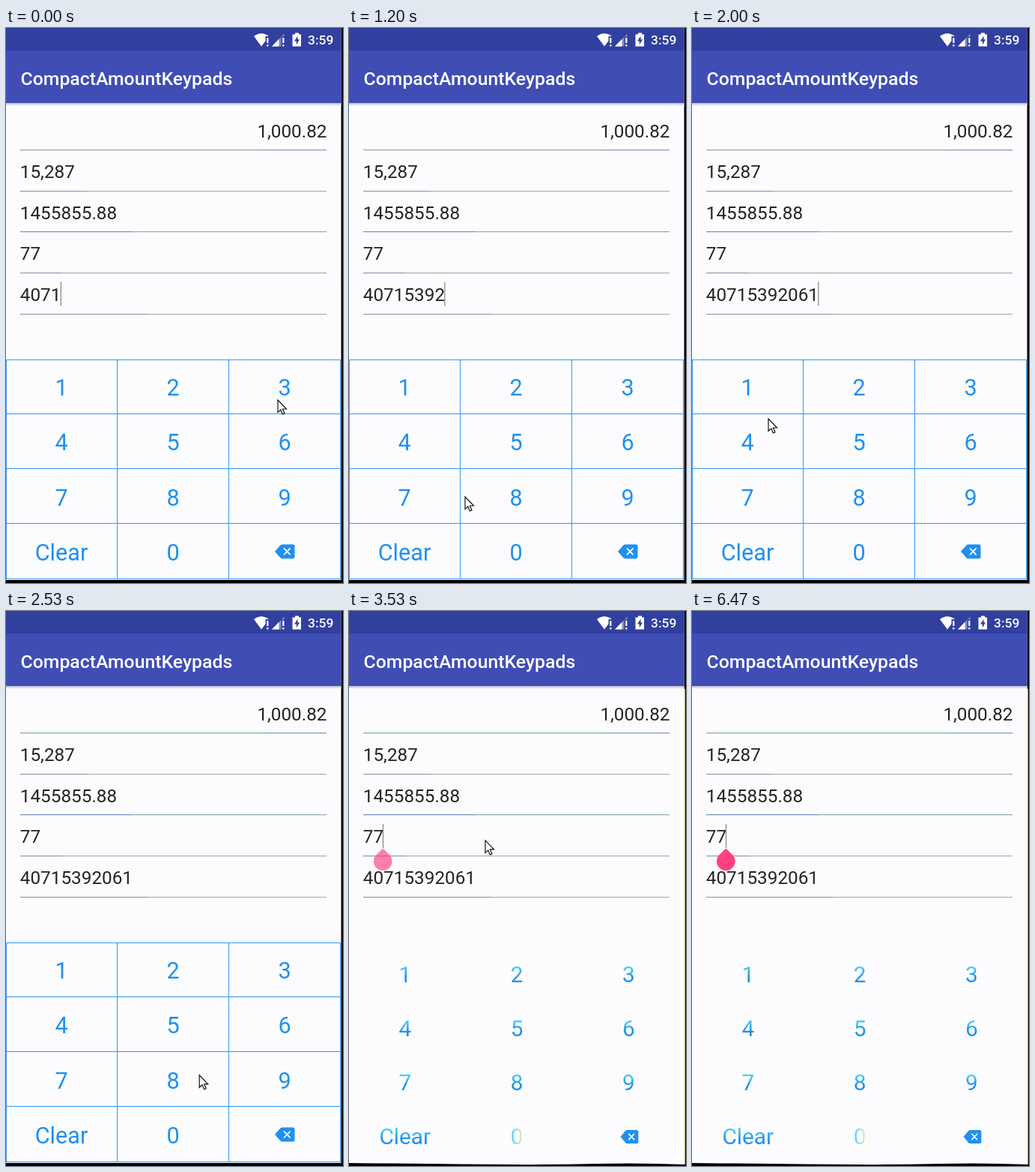
An HTML page for the animation above (6.94 s loop, 450x740 px).

```html
<!DOCTYPE html>
<html lang="en">
<head>
<meta charset="utf-8">
<title>Number pad</title>
<style>
  html, body { margin: 0; width: 100%; height: 100%; overflow: hidden; background: #000; }
  svg { display: block; width: 450px; height: 740px; font-family: Roboto, sans-serif; }
  .title { font-size: 24.8px; font-weight: 500; fill: #fff; }
  .clock { font-size: 17.4px; font-weight: 500; fill: #fff; }
  .field { font-size: 24.3px; fill: #242424; }
  .key { font-size: 30.6px; fill: #2090f0; text-anchor: middle; }
  .soft .key { font-size: 29.8px; fill: url(#ink); }
  .soft .pale { fill: url(#paleInk); }
  .grid { fill: none; stroke: #3498f2; shape-rendering: crispEdges; }

  .lined, .soft, #handle { animation: 6940ms step-end infinite; }
  .lined { animation-name: lined; }
  .soft { animation-name: soft; }
  #handle { animation-name: handle; }
  @keyframes lined { 0% { opacity: 1 } 48.5% { opacity: 0 } 100% { opacity: 0 } }
  @keyframes soft { 0% { opacity: 0 } 48.5% { opacity: 1 } 100% { opacity: 1 } }
  @keyframes handle { 0% { opacity: 0 } 48.5% { opacity: .66 } 56.63% { opacity: 1 } 100% { opacity: 1 } }
</style>
</head>
<body>
<svg viewBox="0 0 450 740">
  <defs>
    <linearGradient id="ink" x1="0" y1="0" x2="0" y2="1">
      <stop offset=".25" stop-color="#48ccf6"/><stop offset=".6" stop-color="#2090ec"/>
    </linearGradient>
    <linearGradient id="paleInk">
      <stop offset=".2" stop-color="#6fd4f4"/><stop offset=".9" stop-color="#e4f0b8"/>
    </linearGradient>
    <linearGradient id="shade" x1="0" y1="0" x2="0" y2="1">
      <stop offset="0" stop-color="#bcbccc"/><stop offset="1" stop-color="#fcfcfe"/>
    </linearGradient>
    <g id="erase">
      <path d="M0 9.5 L7 1.6 Q8.2 0 10 0 H24 Q26.5 0 26.5 2.5 V16.5 Q26.5 19 24 19 H10 Q8.2 19 7 17.4 Z" fill="#2090f0"/>
      <path d="M12 5.2 l8.6 8.6 m0 -8.6 l-8.6 8.6" stroke="#fff" stroke-width="1.7"/>
    </g>
  </defs>

  <rect width="447.5" height="736" fill="#fcfcfe"/>
  <g class="soft">
    <path d="M0 104 H448.6 V738 Q390 735.5 330 737 T215 738 T60 736.5 T0 736 Z" fill="#fcfcfe"/>
    <path d="M448 104 V737" stroke="#e6ee7c"/>
  </g>
  <rect y="100" width="447.5" height="4" fill="url(#shade)"/>
  <rect width="447.5" height="30" fill="#313f9f"/>
  <rect y="30" width="447.5" height="70" fill="#3f4db5"/>

  <g fill="#fff">
    <path d="M331 11 Q341 3.5 351 11 H346.5 V17.3 L341 24.5 Z"/>
    <path d="M348.2 13 h2.2 v7 h-2.2 z M348.2 22 h2.2 v2.4 h-2.2 z"/>
    <path d="M355 24.5 L371.5 7.5 V11.5 H367.5 V24.5 Z" opacity=".4"/>
    <path d="M355 24.5 L364.5 14.7 V24.5 Z"/>
    <path d="M369.2 13 h2.2 v7 h-2.2 z M369.2 22 h2.2 v2.4 h-2.2 z"/>
    <path d="M386 6.5 h5 v2 h3 v16 h-11.5 v-16 h3.5 z"/>
  </g>
  <path d="M389.5 10.5 L385 17.5 H387.8 V22.5 L392 15.2 H389.5 Z" fill="#313f9f"/>
  <text class="clock" x="403" y="22">3:59</text>
  <text class="title" x="19.5" y="75.5">CompactAmountKeypads</text>

  <g id="fields"></g>
  <g id="lined" class="lined">
    <path class="grid" d="M.5 442.5 H446.5 V734.5 H.5 Z M0 514.5 H447 M0 587.5 H447 M0 660.5 H447 M148.5 442 V735 M297.5 442 V735"/>
    <use href="#erase" x="359" y="688.5"/>
  </g>
  <g id="soft" class="soft">
    <use href="#erase" transform="translate(362.5 692) scale(.9 .95)"/>
  </g>

  <path id="caret" d="M0 0 V32" stroke="#85857c" stroke-width="1.2"/>
  <path id="handle" d="M45.3 316.5 L54 325 A12.3 12.3 0 1 1 36.6 325 Z" fill="#ff4081"/>
  <path id="pointer" d="M0 0 V16.5 L3.8 13 L6.4 19 L9 17.9 L6.4 12 H11.5 Z" fill="#fff" stroke="#111" stroke-width="1.2"/>
</svg>

<script>
const LOOP = 6940, STEP = 1000 / 15;
const NUMBER = "40715392061";
const DIGIT = 13.64, LEFT = 18.8;
const presses = [133, 400, 667, 933, 1330, 1600, 1930];
const FOCUS = 3366;
// time, x, y of the mouse
const route = [
  [0, 363, 496], [130, 364, 498], [330, 365, 556], [430, 365, 560],
  [630, 365, 622], [700, 363, 627], [900, 222, 630], [1070, 208, 629],
  [1200, 155, 625], [1430, 92, 626], [1670, 92, 622], [1870, 101, 525],
  [2000, 102, 521], [2200, 112, 535], [2530, 258, 619], [2700, 266, 610],
  [3130, 186, 318], [3330, 182, 306], [3530, 182, 306], [3800, 186, 300],
  [4070, 207, 258], [4270, 207, 258], [4800, 452, 742]
];

const $ = id => document.getElementById(id);
function add(parent, tag, attrs, text = "") {
  const el = document.createElementNS("http://www.w3.org/2000/svg", tag);
  for (const name in attrs) el.setAttribute(name, attrs[name]);
  el.textContent = text;
  parent.append(el);
  return el;
}

// text, line colours left and right, length of the left part
const rows = [
  ["1,000.82", "#8cae90", "#8698c4", 325],
  ["15,287", "#9a9ca6", "#aeb2ae", 90],
  ["1455855.88", "#7c90c4", "#98b0ac", 150],
  ["77", "#8c9cb4", "#a6b0b8", 55],
  ["", "#9a9ca6", "#b0b2b0", 170]
];
const fields = rows.map(([text, left, right, split], i) => {
  const line = Math.floor(162.5 + 54.7 * i) + .5;
  add($("fields"), "path", { d: `M${19 + split} ${line} H428`, stroke: right, "stroke-width": 1.25 });
  add($("fields"), "path", { d: `M19 ${line} h${split}`, stroke: left, "stroke-width": 1.25 });
  return add($("fields"), "text", {
    class: "field", x: i ? LEFT : 428.5, y: Math.floor(146 + 54.6 * i),
    "text-anchor": i ? "start" : "end"
  }, text);
});

function fillPad(pad, x0, y0, dx, dy) {
  [..."123456789", "Clear", "0"].forEach((label, i) => add(pad, "text", {
    class: label === "0" ? "key pale" : "key",
    x: x0 + i % 3 * dx, y: y0 + Math.floor(i / 3) * dy
  }, label));
}
fillPad($("lined"), 74, 490, 149, 73.3);
fillPad($("soft"), 74.8, 495, 149.3, 72.1);

function mouseAt(t) {
  const n = route.findIndex(p => p[0] > t);
  if (n < 0) return route.at(-1).slice(1);
  const [a, b] = [route[n - 1], route[n]];
  const k = (t - a[0]) / (b[0] - a[0]);
  return [a[1] + (b[1] - a[1]) * k, a[2] + (b[2] - a[2]) * k];
}

// Solid for half a second after each press, then blinking
function caretOn(t) {
  if (t >= FOCUS) {
    return t < 3930 || (t >= 4430 && t < 4930) || (t >= 5470 && t < 5930) || t >= 6470;
  }
  const last = presses.filter(p => p <= t).pop() || 0;
  return Math.floor((t - last) / 500) % 2 === 0;
}

function draw() {
  const t = performance.now() % LOOP;
  const count = 4 + presses.filter(p => p <= t).length;
  const text = NUMBER.slice(0, count);
  if (fields[4].textContent !== text) fields[4].textContent = text;

  const [cx, cy] = t < FOCUS ? [LEFT + count * DIGIT, 338.5] : [45.5, 284];
  $("caret").setAttribute("transform", `translate(${cx} ${cy})`);
  $("caret").style.opacity = caretOn(t) ? 1 : 0;

  const [mx, my] = mouseAt(Math.floor((t + 4) / STEP) * STEP);
  $("pointer").setAttribute("transform", `translate(${mx.toFixed(1)} ${my.toFixed(1)})`);
  $("pointer").style.opacity = t < 4800 ? 1 : 0;
  requestAnimationFrame(draw);
}
draw();
</script>
</body>
</html>
```
